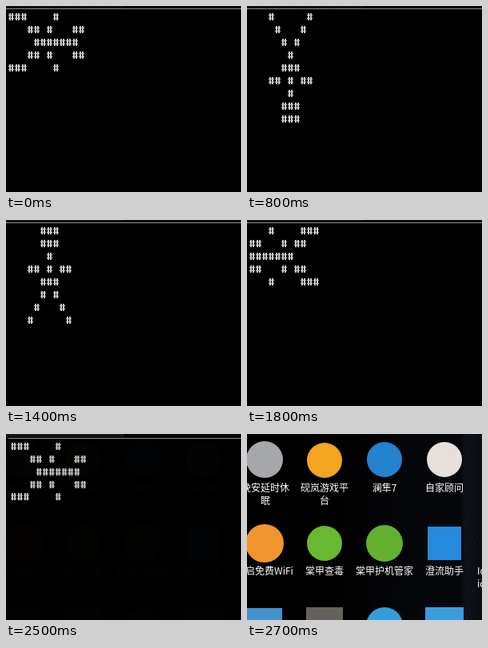
Recreate the animation shown at these times as an HTML page with a canvas. Size 294x233 px, loop 2900 ms.

```html
<!DOCTYPE html>
<html lang="zh-CN">
<head>
<meta charset="utf-8">
<title>Tumbling figure</title>
<style>
html, body { margin: 0; width: 100%; height: 100%; overflow: hidden; background: #000; }
canvas { display: block; width: 100%; height: 100%; }
</style>
</head>
<body>
<canvas id="stage" width="294" height="233"></canvas>
<script>
const W = 294, H = 233, LOOP = 2900;
const ctx = document.getElementById('stage').getContext('2d');

// 8x16 console bitmap of '#'
const STEMS = '.##.##.', BAR = '#######';
const HASH = [STEMS, STEMS, BAR, STEMS, STEMS, STEMS, BAR, STEMS, STEMS];

const right = [
  '###    #',
  '   ## #   ##',
  '    #######',
  '   ## #   ##',
  '###    #'
];
const left = [
  '   #    ###',
  '##   # ##',
  '#######',
  '##   # ##',
  '   #    ###'
];
const upright = [
  '     ###',
  '     ###',
  '      #',
  '   ## # ##',
  '     ###',
  '     # #',
  '    #   #',
  '   #     #'
];
const inverted = [
  '   #     #',
  '    #   #',
  '     # #',
  '      #',
  '     ###',
  '   ## # ##',
  '      #',
  '     ###',
  '     ###'
];

const OPEN = { scale: 1, x: 0, y: 0, alpha: 1 };
const STEPS = [
  { at: 0, pose: right, win: OPEN },
  { at: 100, pose: upright, win: OPEN },
  { at: 400, pose: right, win: OPEN },
  { at: 800, pose: inverted, win: OPEN },
  { at: 1100, pose: right, win: OPEN },
  { at: 1400, pose: upright, win: OPEN },
  { at: 1800, pose: left, win: OPEN },
  { at: 2200, pose: inverted, win: OPEN },
  { at: 2500, pose: right, win: { scale: 0.993, x: 3, y: 2, alpha: 0.985 } },
  { at: 2600, pose: right, win: { scale: 0.95, x: 19, y: 9, alpha: 0.35 } },
  { at: 2700 }
];

function stamp(rows, x, y, dx, dy, draw) {
  rows.forEach((row, j) => [...row].forEach((c, i) => {
    if (c === '#') draw(x + i * dx, y + j * dy);
  }));
}

function layer(w, h, paint) {
  const c = document.createElement('canvas');
  c.width = w;
  c.height = h;
  paint(c.getContext('2d'));
  return c;
}

const glyph = layer(7, 9, g => {
  g.fillStyle = '#c8c8c8';
  stamp(HASH, 0, 0, 1, 1, (x, y) => g.fillRect(x, y, 1, 1));
});

const disc = (g, x, y, r, color) => {
  g.fillStyle = color;
  g.beginPath();
  g.arc(x, y, r, 0, Math.PI * 2);
  g.fill();
};

const square = (g, x, y, size, color) => {
  g.fillStyle = color;
  g.fillRect(x - size / 2, y - size / 2, size, size);
};

function label(g, x, y, ...lines) {
  lines.forEach((line, i) => g.fillText(line, x, y + i * 16));
}

function wallpaper(g) {
  g.fillStyle = '#000';
  g.fillRect(0, 0, W, H);
  const sky = g.createLinearGradient(0, 0, W, 0);
  sky.addColorStop(0.35, '#000');
  sky.addColorStop(0.75, '#06070b');
  sky.addColorStop(0.91, '#05060a');
  sky.addColorStop(0.93, '#10121b');
  sky.addColorStop(1, '#0a0b13');
  g.fillStyle = sky;
  g.fillRect(0, 0, W, H);

  let seed = 11;
  const rnd = () => (seed = seed * 16807 % 2147483647) / 2147483647;
  g.fillStyle = 'rgba(110,115,140,.25)';
  for (let i = 0; i < 90; i++) {
    g.fillRect(Math.floor(W - 165 * rnd() * rnd()), Math.floor(H * rnd()), 1, 1);
  }
}

const desktop = layer(W, H, g => {
  wallpaper(g);

  disc(g, 22, 32, 23, '#a6a7aa');
  disc(g, 97, 33, 22, '#f3a51f');
  disc(g, 172, 32, 22, '#2482cf');
  disc(g, 247, 32, 22, '#e6dfdc');

  disc(g, 22, 137, 24, '#f0952c');
  disc(g, 97, 137, 22, '#68b92f');
  disc(g, 172, 137, 23, '#62b02e');
  square(g, 247, 137, 42, '#2589dc');

  square(g, 22, 240, 44, '#4290cc');
  square(g, 97, 240, 46, '#65615c');
  disc(g, 172, 240, 23, '#329ddb');
  square(g, 247, 241, 48, '#3b9cdb');

  g.font = '12px "Noto Sans CJK SC", "Noto Sans CJK", "Noto Sans", sans-serif';
  g.textAlign = 'center';
  g.textBaseline = 'alphabetic';
  g.fillStyle = '#fff';
  g.shadowColor = '#000';
  g.shadowBlur = 2;
  g.shadowOffsetX = g.shadowOffsetY = 1;
  label(g, 23, 72, '晚安延时休', '眠');
  label(g, 97, 72, '砚岚游戏平', '台');
  label(g, 172, 72, '澜隼7');
  label(g, 247, 72, '自家顾问');
  label(g, 22, 176, '开启免费WiFi');
  label(g, 97, 176, '棠甲查毒');
  label(g, 172, 176, '棠甲护机管家');
  label(g, 247, 176, '澄流助手');
  g.textAlign = 'left';
  label(g, 288, 176, 'Ic', 'ic');
});

function titleBar() {
  ctx.fillStyle = '#050505';
  ctx.fillRect(-8, -28, 700, 31);
  const glow = ctx.createLinearGradient(0, -20, 0, 3);
  glow.addColorStop(0, 'rgba(255,255,255,0)');
  glow.addColorStop(0.5, 'rgba(255,255,255,.35)');
  glow.addColorStop(0.85, 'rgba(255,255,255,.06)');
  glow.addColorStop(1, 'rgba(255,255,255,.03)');
  ctx.fillStyle = glow;
  ctx.fillRect(-4, -20, 150, 23);
  square(ctx, 0, -8, 14, '#1c1c1c');
  ctx.font = '12px "Open Sans", "Noto Sans", sans-serif';
  ctx.textBaseline = 'middle';
  ctx.fillStyle = '#000';
  ctx.fillText('C:\\Python27\\python.exe', 13, -8);
  ctx.fillStyle = '#8f8f8f';
  ctx.fillRect(0, 3, 690, 1);
}

function consoleWindow(pose, win) {
  ctx.save();
  ctx.globalAlpha = win.alpha;
  ctx.setTransform(win.scale, 0, 0, win.scale, win.x, win.y);
  ctx.fillStyle = '#000';
  ctx.fillRect(-8, 3, 700, 400);
  titleBar();
  stamp(pose, 3, 9, 8, 16, (x, y) => ctx.drawImage(glyph, x, y));
  ctx.restore();
}

function draw(t) {
  const step = STEPS.filter(s => s.at <= t).pop();
  ctx.drawImage(desktop, 0, 0);
  if (step.pose) consoleWindow(step.pose, step.win);
}

const start = performance.now();
function tick() {
  draw((performance.now() - start) % LOOP);
  requestAnimationFrame(tick);
}
tick();
</script>
</body>
</html>
```
